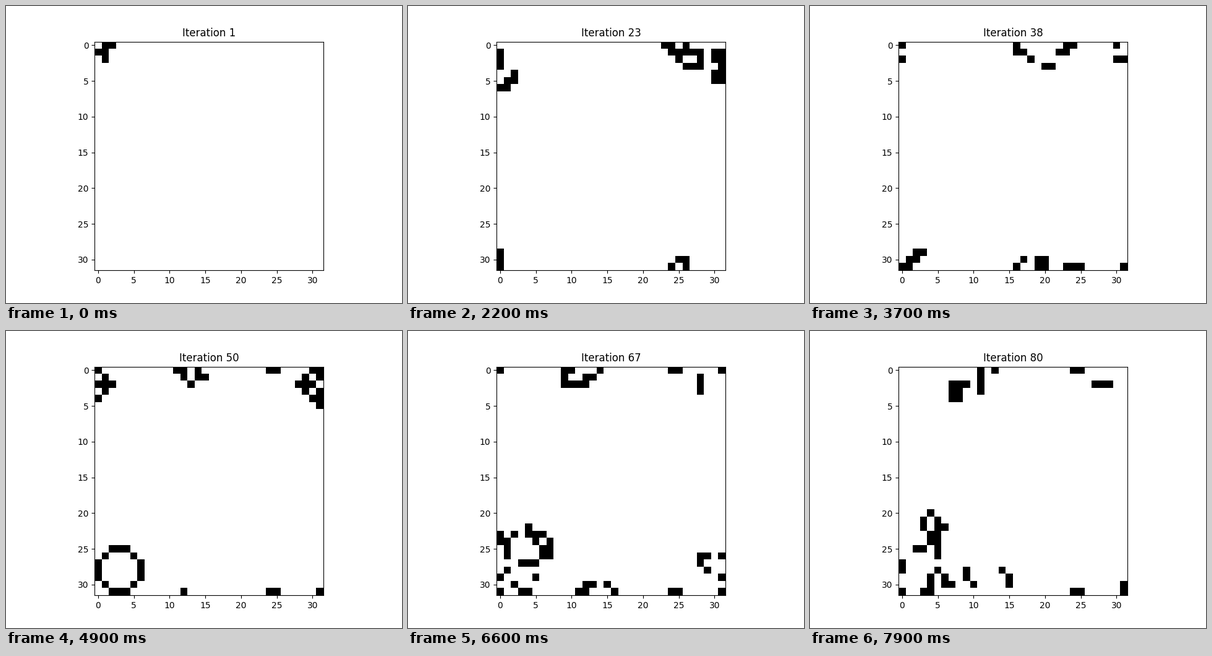
These frames come from a looping animation (640 by 480 pixels, 8 s). A matplotlib script:

```python
import matplotlib.pyplot as plt
import numpy as np
from matplotlib.animation import FuncAnimation

SIZE = 32
FRAMES = 80
INTERVAL = 100  # ms
SEED = [(0, 1), (0, 2), (1, 0), (1, 1), (2, 1)]  # R-pentomino


def step(grid):
    """One generation of the Game of Life on a torus."""
    around = sum(
        np.roll(grid, (dr, dc), axis=(0, 1))
        for dr in (-1, 0, 1)
        for dc in (-1, 0, 1)
        if dr or dc
    )
    return ((around == 3) | ((grid == 1) & (around == 2))).astype(int)


def evolve():
    grid = np.zeros((SIZE, SIZE), dtype=int)
    for cell in SEED:
        grid[cell] = 1
    states = [grid]
    while len(states) < FRAMES:
        states.append(step(states[-1]))
    return states


states = evolve()

fig, ax = plt.subplots(figsize=(6.4, 4.8), dpi=100)
image = ax.imshow(states[0], cmap="binary", vmin=0, vmax=1, interpolation="nearest")
title = ax.set_title("Iteration 1")


def draw(i):
    image.set_data(states[i])
    title.set_text(f"Iteration {i + 1}")
    return image, title


anim = FuncAnimation(fig, draw, frames=FRAMES, interval=INTERVAL, repeat=True, repeat_delay=0)
plt.show()
```
